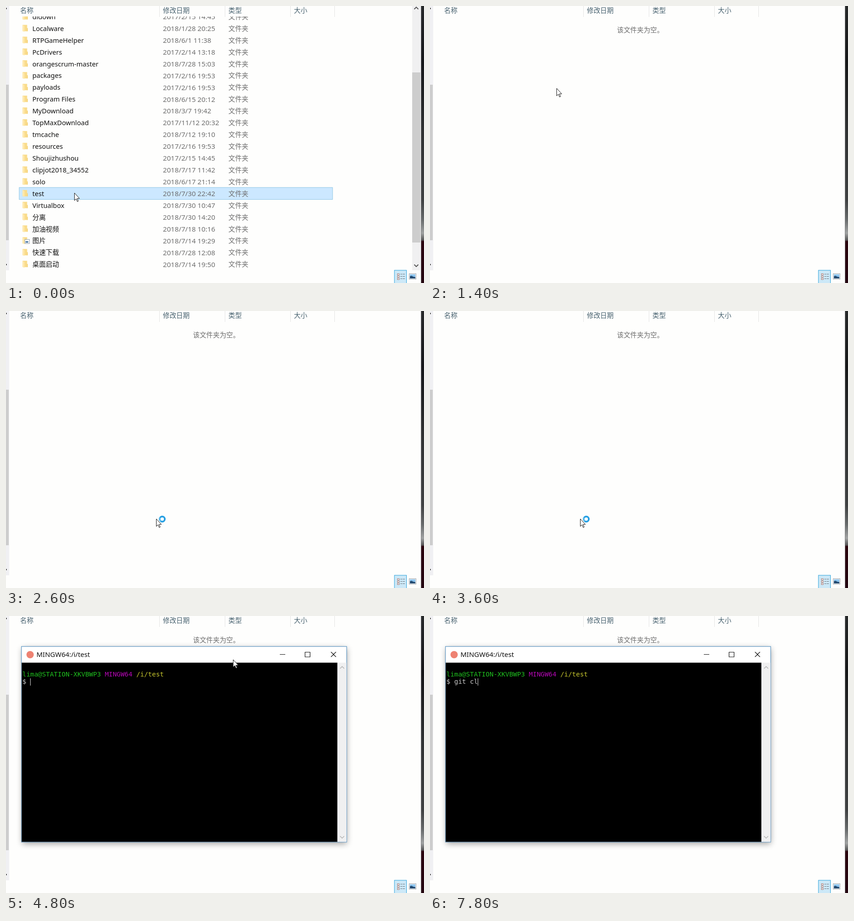
Recreate the animation shown at these times as an HTML page. Size 919 px wide and 609 px high, loop 8000 ms.

```html
<!DOCTYPE html>
<html lang="zh-CN">
<head>
<meta charset="utf-8">
<style>
  html, body { margin: 0; width: 100%; height: 100%; overflow: hidden; background: #fefefd; }
  svg { display: block; width: 100vw; height: 100vh; }
  text { font: 14.67px "Noto Sans", "Noto Sans CJK SC", "Noto Sans CJK", sans-serif; white-space: pre; }
  .date { font-size: 15.2px; }
  .title { font-size: 15px; }
  .mono { font: 14.35px "DejaVu Sans Mono", monospace; }
</style>
</head>
<body>
<svg viewBox="0 0 919 609">
  <defs>
    <linearGradient id="edge" x2="0" y2="1">
      <stop offset="0" stop-color="#27292a"/>
      <stop offset=".2" stop-color="#161718"/>
      <stop offset=".45" stop-color="#303233"/>
      <stop offset=".7" stop-color="#3f4142"/>
      <stop offset=".77" stop-color="#66696a"/>
      <stop offset=".82" stop-color="#a0a2a2"/>
      <stop offset=".845" stop-color="#555"/>
      <stop offset=".85" stop-color="#2b030d"/>
      <stop offset="1" stop-color="#240610"/>
    </linearGradient>
    <clipPath id="below"><path d="M0 23H919V609H0Z"/></clipPath>
    <filter id="soft" x="-10%" y="-10%" width="120%" height="120%"><feGaussianBlur stdDeviation="7"/></filter>
  </defs>
  <g id="base"></g>
  <g id="list"></g>
  <g id="empty"></g>
  <g id="menu"></g>
  <g id="term"></g>
  <g id="pointer">
    <path d="M.5 0V16.5L4.2 13L6.8 19L9.1 18L6.5 12.2H11.6Z" fill="#fff" stroke="#111" stroke-width="1"/>
    <g id="busy" transform="translate(13.5 .5)">
      <circle r="5.6" fill="#fff" stroke="#269fe2" stroke-width="3.8"/>
      <path id="spark" d="M5.6 0A5.6 5.6 0 0 1 0 5.6" fill="none" stroke="#5fbcec" stroke-width="3.4"/>
    </g>
  </g>
</svg>
<script>
const LOOP = 8000, STEP = 200;
const $ = id => document.getElementById(id);
const rect = (x, y, w, h, fill, more = '') =>
  `<rect x="${x}" y="${y}" width="${w}" height="${h}" fill="${fill}" ${more}/>`;
const line = (d, color, w = 1) => `<path d="${d}" fill="none" stroke="${color}" stroke-width="${w}"/>`;
const text = (x, y, s, fill = '#111', cls = '') => `<text x="${x}" y="${y}" fill="${fill}" class="${cls}">${s}</text>`;
const badge = (x, y) => `<circle cx="${x}" cy="${y}" r="8" fill="#ee8272"/>`;

function drawBase() {
  const heads = [[31, '名称'], [345, '修改日期'], [489, '类型'], [633, '大小']];
  let s = rect(0, 0, 7, 581, '#f0f0f3') + rect(0, 173, 6, 342, '#cdcdcd') +
    rect(0, 4, 1.5, 3, '#333') + rect(0, 567, 1.5, 3, '#333') +
    rect(912, 0, 1, 609, '#8c8d8e') + rect(913, 0, 6, 609, 'url(#edge)');
  s += heads.map(([x, h]) => text(x, 14.5, h, '#46606e')).join('');
  s += [337.5, 481.5, 625.5, 722.5].map(x => line(`M${x} 0V24`, '#e3e3e3')).join('');
  s += rect(854, 581, 26.5, 30, '#cce8f7', 'stroke="#26a0da"');
  for (let y = 588; y < 602; y += 5)
    s += rect(860.5, y + .5, 4, 3, '#fff', 'stroke="#a5746c"') +
      line(`M867 ${y + 1.5}h4M872 ${y + 1.5}h5`, '#6b7680');
  s += rect(886.5, 588.5, 15, 12, '#fff', 'stroke="#9aa0a6"') + rect(888, 590, 12, 9, '#8cc4ee') +
    '<path d="M888 599v-5q4-2 7 1l5 1v3z" fill="#234a70"/>';
  return s;
}

function folder(y) {
  return rect(36.5, y - 8, 10, 14, '#f9dc8c') +
    `<path d="M36.5 ${y - 8}l4 2.5v13l-4-2.5z" fill="#ffe9ae"/>` +
    rect(46, y - 1, 1.8, 7, '#f3cf74');
}

function drawList() {
  const rows = `dldown|2017/2/15 14:45
Localware|2018/1/28 20:25
RTPGameHelper|2018/6/1 11:38
PcDrivers|2017/2/14 13:18
orangescrum-master|2018/7/28 15:03
packages|2017/2/16 19:53
payloads|2017/2/16 19:53
Program Files|2018/6/15 20:12
MyDownload|2018/3/7 19:42
TopMaxDownload|2017/11/12 20:32
tmcache|2018/7/12 19:10
resources|2017/2/16 19:53
Shoujizhushou|2017/2/15 14:45
clipjot2018_34552|2018/7/17 11:42
solo|2018/6/17 21:14
test|2018/7/30 22:42
Virtualbox|2018/7/30 10:47
分离|2018/7/30 14:20
加油视频|2018/7/18 10:16
图片|2018/7/14 19:29
快速下载|2018/7/28 12:08
桌面启动|2018/7/14 19:50`.split('\n');
  let s = rect(29, 399, 689, 26.3, '#cce8ff', 'stroke="#8ec5e4"');
  rows.forEach((row, i) => {
    const [name, date] = row.split('|'), y = 23.6 + i * 25.93;
    s += folder(y) + text(58, y + 5.2, name) +
      text(345, y + 5.4, date, '#6d6d6d', 'date') + text(489, y + 5.2, '文件夹', '#6d6d6d');
    if (name === '图片')
      s += rect(41.5, y - 3, 10, 9, '#fff', 'stroke="#8f9aa5"') + rect(43, y + 1, 6, 3, '#3d6f9e');
  });
  s = `<g clip-path="url(#below)">${s}</g>`;
  s += rect(893, 0, 18, 581, '#f0f0f1') + rect(893, 146, 18, 374, '#cdcdcd');
  return s + line('M897.5 7l4.5-4.5 4.5 4.5M897.5 568.5l4.5 4.5 4.5-4.5', '#505050', 1.8);
}

function drawMenu() {
  // label, centre line, then ">" for a submenu or "-" for a disabled item
  const items = [['查看(V)', 200.5, '>'], ['排序方式(O)', 227.5, '>'], ['分组依据(P)', 254, '>'], ['刷新(E)', 281],
    ['自定义文件夹(F)...', 317], ['粘贴(P)', 352, '-'], ['粘贴快捷方式(S)', 379, '-'],
    ['在 Violet Harbor 中打开(V)', 406], ['Git GUI Here', 433], ['Git Bash Here', 460],
    ['授予访问权限(G)', 495, '>'], ['新建(W)', 531, '>'], ['属性(R)', 566.5]];
  let s = rect(282, 185, 307.5, 402, '#000', 'opacity=".45"') +
    rect(278.5, 181.5, 309, 403, '#f1f1f3', 'stroke="#a0a0a0"') +
    rect(280, 419, 305, 27, '#d9d9da', 'id="hover"');
  for (const y of [298.5, 333.5, 476.5, 512.5, 547.5]) s += line(`M290 ${y}H575`, '#919191');
  for (const [label, y, kind] of items) {
    s += text(319, y + 5.2, label, kind === '-' ? '#828282' : '#111');
    if (kind === '>') s += line(`M566 ${y - 8.5}l8 7.8-8 7.8`, '#222', 1.2);
  }
  return s + badge(300, 432) + badge(300, 459);
}

function drawTerm() {
  return rect(36, 71, 713, 430, '#000', 'opacity=".36" filter="url(#soft)"') +
    rect(34, 67, 715, 430, '#fff', 'stroke="#3a80b8"') +
    rect(34.5, 102.6, 694.2, 393.9, '#000') + rect(728.7, 102.6, 19.8, 393.9, '#f0f0f1') +
    line('M734.5 115.5l4.5-4.5 4.5 4.5M734.5 484l4.5 4.5 4.5-4.5', '#b3b3b3', 1.5) +
    line('M602 84.5h12M657.5 79.5h11v10.5h-11zM714.5 79l11 11M725.5 79l-11 11', '#111', 1.2) +
    badge(53, 85) + text(67, 90, '', '#111', 'title" id="caption') +
    `<g id="prompt"><text class="mono" x="36" y="132.5"><tspan fill="#1fbf1f">lima@STATION-XKVBWP3</tspan>` +
    `<tspan fill="#b507b5"> MINGW64</tspan><tspan fill="#c5c52e"> /i/test</tspan></text>` +
    `<text class="mono" x="36" y="148.8" fill="#c8c8c8">$ <tspan id="typed"></tspan></text></g>` +
    rect(0, 0, 1.2, 16, '#bfbfbf', 'id="caret"');
}

$('base').innerHTML = drawBase();
$('list').innerHTML = drawList();
$('empty').innerHTML = text(411, 58, '该文件夹为空。', '#6d6d6d');
$('menu').innerHTML = drawMenu();
$('term').innerHTML = drawTerm();

const path = [[0, 150, 411], [1000, 150, 411], [1400, 278, 181], [1600, 278, 181], [2000, 329, 447],
  [2200, 330, 457], [3600, 330, 457], [3800, 499, 96], [LOOP, 499, 96]];
const typing = [[5600, 1], [6000, 2], [6200, 3], [6400, 4], [7600, 5], [7800, 6]];

function pointerAt(t) {
  const i = path.findIndex(p => p[0] > t), [t0, x0, y0] = path[i - 1], [t1, x1, y1] = path[i];
  const k = (t - t0) / (t1 - t0);
  return [x0 + (x1 - x0) * k, y0 + (y1 - y0) * k];
}
const show = (id, on) => { $(id).style.display = on ? '' : 'none'; };

function frame(now) {
  const t = Math.floor(now % LOOP / STEP) * STEP;
  const between = (a, b) => t >= a && t < b;
  show('list', t < 200);
  show('empty', t >= 200);
  show('menu', between(1600, 2600));
  show('hover', t >= 2000);
  $('hover').setAttribute('y', t < 2200 ? 419 : 446);

  show('term', t >= 3800);
  $('caption').textContent = t < 4200 ? '/usr/bin/bash --login -i' : 'MINGW64:/i/test';
  const ready = t >= 4600;
  const count = typing.reduce((n, [at, len]) => t >= at ? len : n, 0);
  show('prompt', ready);
  $('typed').textContent = 'git cl'.slice(0, count);
  show('caret', !between(6600, 7200));
  $('caret').setAttribute('x', ready ? 53 + count * 8.64 : 35.5);
  $('caret').setAttribute('y', ready ? 137 : 104);

  show('pointer', t < 5600);
  $('pointer').setAttribute('transform', `translate(${pointerAt(t)})`);
  show('busy', between(2600, 4200));
  $('spark').setAttribute('transform', `rotate(${t * .36 - 90})`);
  requestAnimationFrame(frame);
}
frame(performance.now());
</script>
</body>
</html>
```
